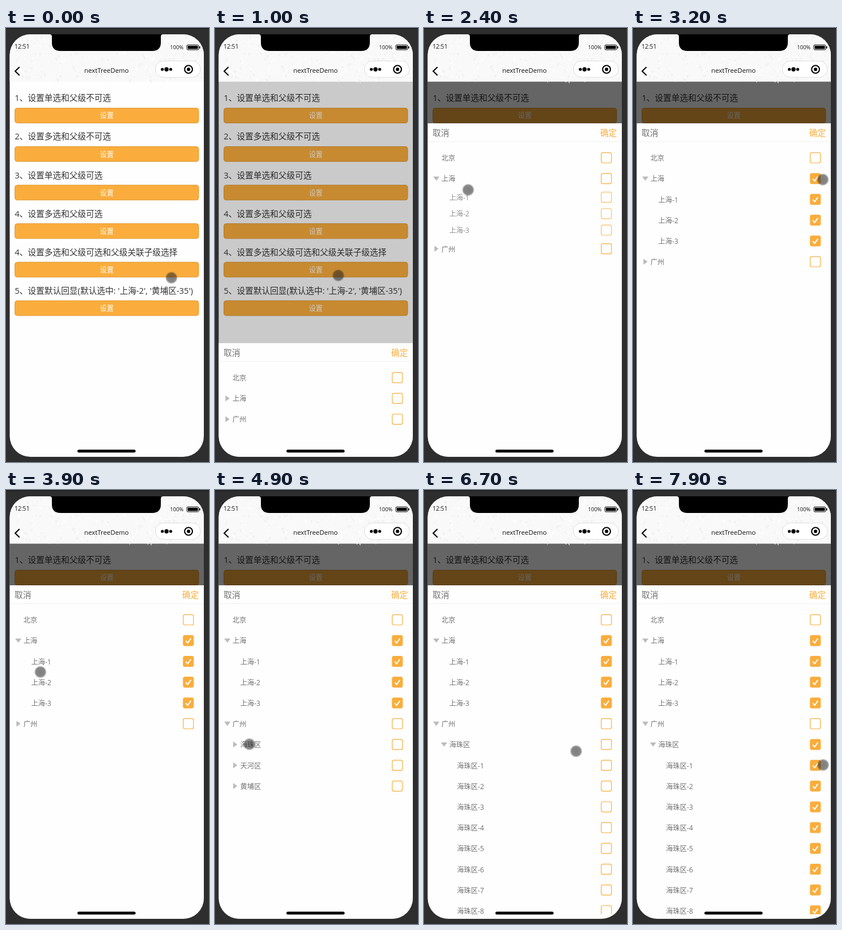
Recreate the animation shown at these times as an HTML page. Size 354 by 756 pixels, loop 8 s.

```html
<!DOCTYPE html>
<html lang="zh-CN">
<head>
<meta charset="utf-8">
<title>nextTreeDemo</title>
<style>
  html, body { margin: 0; width: 100%; height: 100%; overflow: hidden; background: #2e2e2e; }
  svg { display: block; width: 354px; height: 756px; }
  text { font-family: "Open Sans", "Noto Sans CJK SC", "Noto Sans CJK", sans-serif; }
</style>
</head>
<body>
<svg id="stage" viewBox="0 0 354 756" xmlns="http://www.w3.org/2000/svg">
  <defs>
    <clipPath id="screen"><rect x="6.5" y="11" width="338.5" height="736" rx="36"/></clipPath>
    <clipPath id="list"><rect x="6" y="199" width="340" height="540"/></clipPath>
    <radialGradient id="touch">
      <stop offset="0" stop-color="#222" stop-opacity=".58"/>
      <stop offset=".72" stop-color="#222" stop-opacity=".54"/>
      <stop offset=".86" stop-color="#222" stop-opacity=".3"/>
      <stop offset="1" stop-color="#222" stop-opacity="0"/>
    </radialGradient>
  </defs>
  <rect width="354" height="756" fill="#2e2e2e"/>
  <rect width="354" height="1.5" fill="#1c1c1c"/>
  <g clip-path="url(#screen)">
    <rect width="354" height="756" fill="#fefefe"/>
    <g id="page"></g>
    <rect id="shade" y="93" width="354" height="663"/>
    <g id="sheet">
      <rect y="166" width="354" height="590" fill="#fefefe"/>
      <rect x="6" y="197.5" width="340" height="1" fill="#f1f1f1"/>
      <g id="heads"></g>
      <g id="rows" clip-path="url(#list)"></g>
      <rect id="bar" x="329.5" y="211" width="3" height="402.5" rx="1.5" fill="#c9c9cc"/>
    </g>
    <rect y="11" width="354" height="82.5" fill="#f9f9f9"/>
    <g id="texture"></g>
    <path d="M23.5 68 16 75.3l7.5 7.3" fill="none" stroke="#000" stroke-width="2.1"/>
    <rect x="260.5" y="57.5" width="78.5" height="28.5" rx="14.25" fill="#fff" stroke="#dedede"/>
    <circle cx="272.6" cy="72" r="2.6"/><circle cx="279.9" cy="72" r="3.7"/><circle cx="287.2" cy="72" r="2.6"/>
    <circle cx="318.3" cy="72" r="6.8" fill="none" stroke="#000" stroke-width="2.1"/><circle cx="318.3" cy="72" r="3"/>
    <rect x="315.5" y="29.5" width="20.5" height="8.5" rx="1.5" fill="#fff" stroke="#000"/>
    <rect x="317" y="31" width="17.5" height="5.5"/><rect x="337" y="32" width="1.6" height="3.5"/>
    <g id="status"></g>
    <path d="M76 11h198q-4 0-4 4v10q0 15-15 15H95q-15 0-15-15V15q0-4-4-4z"/>
    <rect x="124.5" y="734.5" width="101.5" height="5" rx="2.5"/>
  </g>
  <circle id="cursor" r="11" fill="url(#touch)"/>
</svg>
<script>
const LOOP = 8000, STEP = 100, ROW = 36.2, LIST_TOP = 208;
const ORANGE = '#faad3c';
const $ = id => document.getElementById(id);

function add(parent, tag, attrs, content) {
  const el = document.createElementNS('http://www.w3.org/2000/svg', tag);
  for (const key in attrs) el.setAttribute(key, attrs[key]);
  if (content) el.textContent = content;
  return parent.appendChild(el);
}

// Text placed by its vertical middle.
const label = (parent, content, x, midY, size, fill, anchor = 'start') =>
  add(parent, 'text', { x, y: midY + size * 0.37, 'font-size': size, fill, 'text-anchor': anchor }, content);

function bezierEase(x) {
  const curve = (a, b, s) => 3 * a * s * (1 - s) ** 2 + 3 * b * s * s * (1 - s) + s ** 3;
  let lo = 0, hi = 1;
  for (let i = 0; i < 20; i++) {
    const mid = (lo + hi) / 2;
    if (curve(0.25, 0.25, mid) < x) lo = mid; else hi = mid;
  }
  return curve(0.1, 1, lo);
}

function progress(t, start, duration) {
  const x = (t - start) / duration;
  return x <= 0 ? 0 : x >= 1 ? 1 : bezierEase(x);
}

// Status bar and header
label($('status'), '12:51', 15, 32.3, 10.2, '#111');
label($('status'), '100%', 286, 34, 9.4, '#111');
label($('status'), 'nextTreeDemo', 175.3, 73.8, 11.3, '#111', 'middle');

let seed = 7;
const random = () => (seed = seed * 16807 % 2147483647) / 2147483647;
for (let i = 0; i < 330; i++) {
  const x = 7 + random() * 337, y = 11 + random() * 80, s = 2 + random() * 4;
  add($('texture'), 'path', {
    d: `M${x} ${y}l${s} ${s * (random() - 0.5)}l${-s * random()} ${s}z`,
    fill: random() < 0.5 ? '#fff' : '#eee', opacity: 0.7
  });
}

// Demo page
['1、设置单选和父级不可选', '2、设置多选和父级不可选', '3、设置单选和父级可选',
 '4、设置多选和父级可选', '4、设置多选和父级可选和父级关联子级选择',
 "5、设置默认回显(默认选中: '上海-2', '黄埔区-35')"].forEach((title, i) => {
  const y = 122 + i * 67.1;
  label($('page'), title, 15.3, y, 14.5, '#333');
  add($('page'), 'rect', { x: 15.5, y: y + 17.5, width: 320.5, height: 26, rx: 4, fill: ORANGE, stroke: '#de9a37' });
  label($('page'), '设置', 175.7, y + 31, 12, '#fff', 'middle');
});

// Tree
label($('heads'), '取消', 15, 182.5, 14.5, '#707070');
label($('heads'), '确定', 336.3, 182.5, 14.5, ORANGE, 'end');

const rows = [];
function node(name, parent, { openAt, checkAt = Infinity } = {}) {
  const depth = parent ? parent.depth + 1 : 0;
  const g = add($('rows'), 'g', {});
  const row = { g, parent, depth, openAt, checkAt };
  const x = 30.5 + depth * 13.5;
  if (openAt) row.arrow = add(g, 'path', { fill: '#bbb' });
  label(g, name, x, 0.6, 12.1, '#707070');
  row.box = add(g, 'rect', { x: 309.1, y: -8.9, width: 17.8, height: 17.8, rx: 3, stroke: ORANGE, 'stroke-width': 1.2 });
  row.tick = add(g, 'path', { d: 'M313.6 .4l3.2 3.8 5.6-8', fill: 'none', stroke: '#fff', 'stroke-width': 2 });
  rows.push(row);
  return row;
}

node('北京');
const shanghai = node('上海', null, { openAt: 2302, checkAt: 3200 });
for (let i = 1; i <= 3; i++) node('上海-' + i, shanghai, { checkAt: 3200 });
const guangzhou = node('广州', null, { openAt: 4402 });
const haizhu = node('海珠区', guangzhou, { openAt: 5102, checkAt: 7400 });
for (let i = 1; i <= 10; i++) node('海珠区-' + i, haizhu, { checkAt: 7400 });
node('天河区', guangzhou, { openAt: Infinity });
node('黄埔区', guangzhou, { openAt: Infinity });

const openness = (row, t) =>
  row ? progress(t, row.openAt, 200) * openness(row.parent, t) : 1;

function drawRows(t) {
  let y = LIST_TOP;
  for (const row of rows) {
    const p = openness(row.parent, t), checked = t >= row.checkAt;
    row.g.setAttribute('transform', `translate(0 ${y + ROW * p / 2})`);
    row.g.setAttribute('opacity', p);
    row.box.setAttribute('fill', checked ? ORANGE : '#fff');
    row.tick.setAttribute('visibility', checked ? 'visible' : 'hidden');
    if (row.arrow) {
      const x = 21.5 + row.depth * 13.5;
      row.arrow.setAttribute('d', t > row.openAt
        ? `M${x - 5.5}-3.5h11l-5.5 7.3z` : `M${x - 3.3}-5.2v10.4l7.2-5.2z`);
    }
    y += ROW * p;
  }
}

// Touch path: time, x, y
const path = [
  [0, 288.5, 435], [400, 215, 431], [1000, 215, 431], [1500, 351, 282], [1600, 351, 281],
  [1800, 135, 276], [2100, 53, 273], [2300, 53, 273], [2400, 77, 282], [3000, 331, 268],
  [3200, 331, 264], [3300, 330, 264], [3900, 60, 317], [4000, 64, 356], [4100, 98, 386],
  [4300, 52, 430], [4500, 52, 430], [5000, 62, 446], [5200, 62, 446], [6100, 59, 452],
  [6900, 334, 456], [7200, 332, 461], [7300, 332, 461], [7400, 331, 440], [7900, 331.5, 479]
];

function drawCursor(t) {
  const i = Math.max(1, path.findIndex(k => k[0] >= t));
  const [t0, x0, y0] = path[i - 1], [t1, x1, y1] = path[i];
  const k = (t - t0) / (t1 - t0);
  $('cursor').setAttribute('cx', x0 + (x1 - x0) * k);
  $('cursor').setAttribute('cy', y0 + (y1 - y0) * k);
  $('cursor').setAttribute('visibility', t > 5200 && t < 6100 ? 'hidden' : 'visible');
}

function draw(now) {
  const t = Math.floor(now % LOOP / STEP) * STEP;
  const up = progress(t, 934, 300);
  $('shade').setAttribute('opacity', 0.6 * up);
  $('sheet').setAttribute('transform', `translate(0 ${581 * (1 - up)})`);
  $('bar').setAttribute('opacity', t >= 5300 && t < 6000 ? 1 : 0);
  drawRows(t);
  drawCursor(t);
}

let start;
function tick(now) {
  start ??= now;
  draw(now - start);
  requestAnimationFrame(tick);
}
draw(0);
requestAnimationFrame(tick);
</script>
</body>
</html>
```
